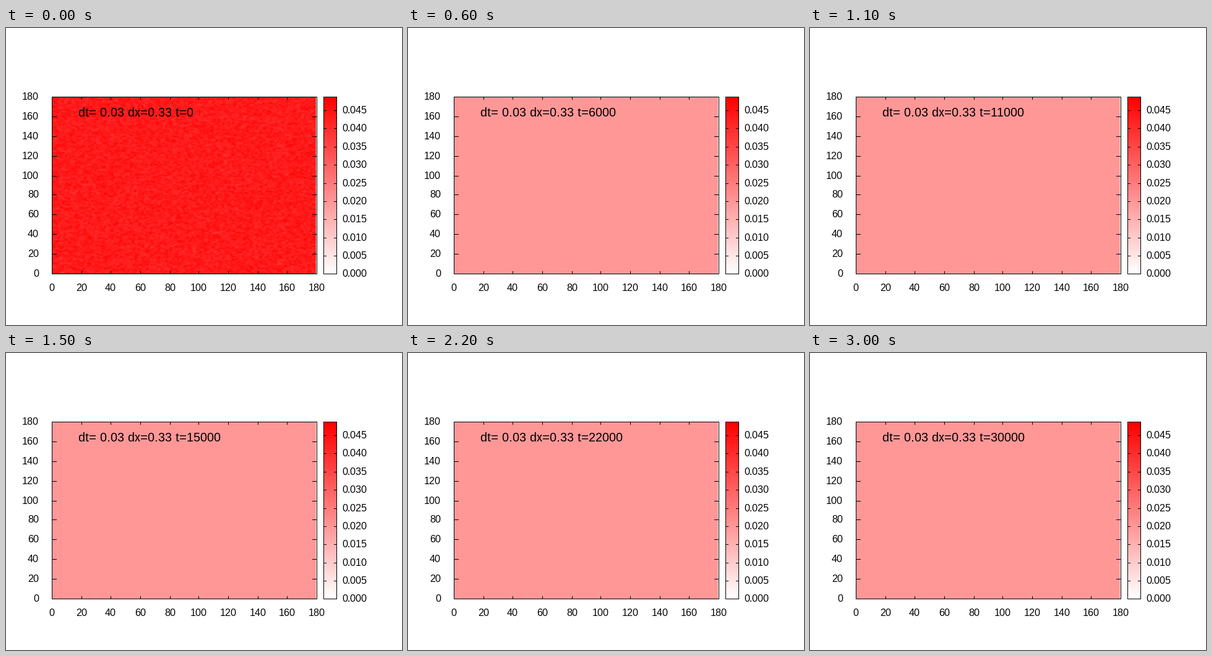
A matplotlib script that plays this animation: 640 by 480 pixels, repeating every 3100 ms.

```python
import numpy as np
import matplotlib.pyplot as plt
from matplotlib.animation import FuncAnimation
from matplotlib.colors import LinearSegmentedColormap
from matplotlib.patches import Rectangle

W, H, DPI = 640, 480, 100
LEFT, RIGHT, TOP, BOTTOM = 74, 502, 111, 397
BAR_LEFT, BAR_RIGHT = 513, 534
V_MAX = 0.04867
CELLS = 180
FRAMES, INTERVAL = 31, 100

plt.rcParams["font.family"] = "Liberation Sans"
plt.rcParams["text.hinting"] = "no_autohint"
plt.rcParams["text.hinting_factor"] = 1  # whole-pixel glyph advances

fig = plt.figure(figsize=(W / DPI, H / DPI), dpi=DPI, facecolor="white")
ax = fig.add_axes([0, 0, 1, 1])
ax.axis("off")
reds = LinearSegmentedColormap.from_list("reds", ["#ffffff", "#ff0000"])


def heat(data, x0, x1):
    return ax.imshow(data, cmap=reds, vmin=0, vmax=V_MAX, aspect="auto",
                     interpolation="nearest",
                     extent=(x0, x1, BOTTOM, TOP + 1))


def block(x, y, w, h):
    ax.add_patch(Rectangle((x, y), w, h, fc="black", lw=0,
                           antialiased=False, zorder=3))


def frame_box(x0, x1):
    for y in (TOP, BOTTOM):
        block(x0, y, x1 - x0 + 1, 1)
    for x in (x0, x1):
        block(x, TOP, 1, BOTTOM - TOP + 1)


def side_ticks(x0, x1, y, size):
    block(x0, y, size, 1)
    block(x1 - size + 1, y, size, 1)


def label(x, y, text, ha, px=16):
    return ax.text(x, y, text, ha=ha, va="baseline", color="black",
                   fontsize=px * 72 / DPI, zorder=4)


def grid_pixel(a, b, share):
    """Pixel at a share of the way from a to b, truncated towards the middle."""
    mid, half = (a + b) // 2, abs(b - a) / 2 + 0.5
    side = 1 if b > a else -1
    return mid + side * int(half * (2 * share - 1))


def noisy_field():
    """Random start values, averaged over the four corners of each cell."""
    raw = np.random.default_rng(7).uniform(V_MAX - 0.01, V_MAX,
                                           (CELLS, CELLS))
    return (raw[1:, 1:] + raw[:-1, 1:] + raw[1:, :-1] + raw[:-1, :-1]) / 4


start = noisy_field()


def field(i):
    if i == 0:
        return start
    return np.full_like(start, 0.0191 if i == 1 else 0.0199)


plot = heat(start, LEFT + 1, RIGHT - 1)
heat(np.linspace(V_MAX, 0, BOTTOM - TOP - 1)[:, None],
     BAR_LEFT + 1, BAR_RIGHT)
ax.set_xlim(0, W)
ax.set_ylim(H, 0)

frame_box(LEFT, RIGHT)
frame_box(BAR_LEFT, BAR_RIGHT)

for v in range(0, CELLS + 1, 20):
    x = grid_pixel(LEFT, RIGHT, v / CELLS)
    y = grid_pixel(BOTTOM, TOP, v / CELLS)
    block(x, TOP, 1, 5)
    block(x, BOTTOM - 4, 1, 5)
    side_ticks(LEFT, RIGHT, y, 8)
    label(x, 425, str(v), "center")
    label(53, y + 5, str(v), "right")

for k in range(10):
    v = 0.005 * k
    y = BOTTOM - int((BOTTOM - TOP) * v / V_MAX)
    side_ticks(BAR_LEFT, BAR_RIGHT, y, 5)
    label(543, y + 5, f"{v:.3f}", "left")

title = label(117, 143, "", "left", px=20)


def update(i):
    plot.set_data(field(i))
    title.set_text(f"dt= 0.03 dx=0.33 t={1000 * i}")
    return plot, title


anim = FuncAnimation(fig, update, frames=FRAMES, interval=INTERVAL,
                     init_func=lambda: update(0), repeat=True,
                     repeat_delay=0, blit=False)
plt.show()
```
